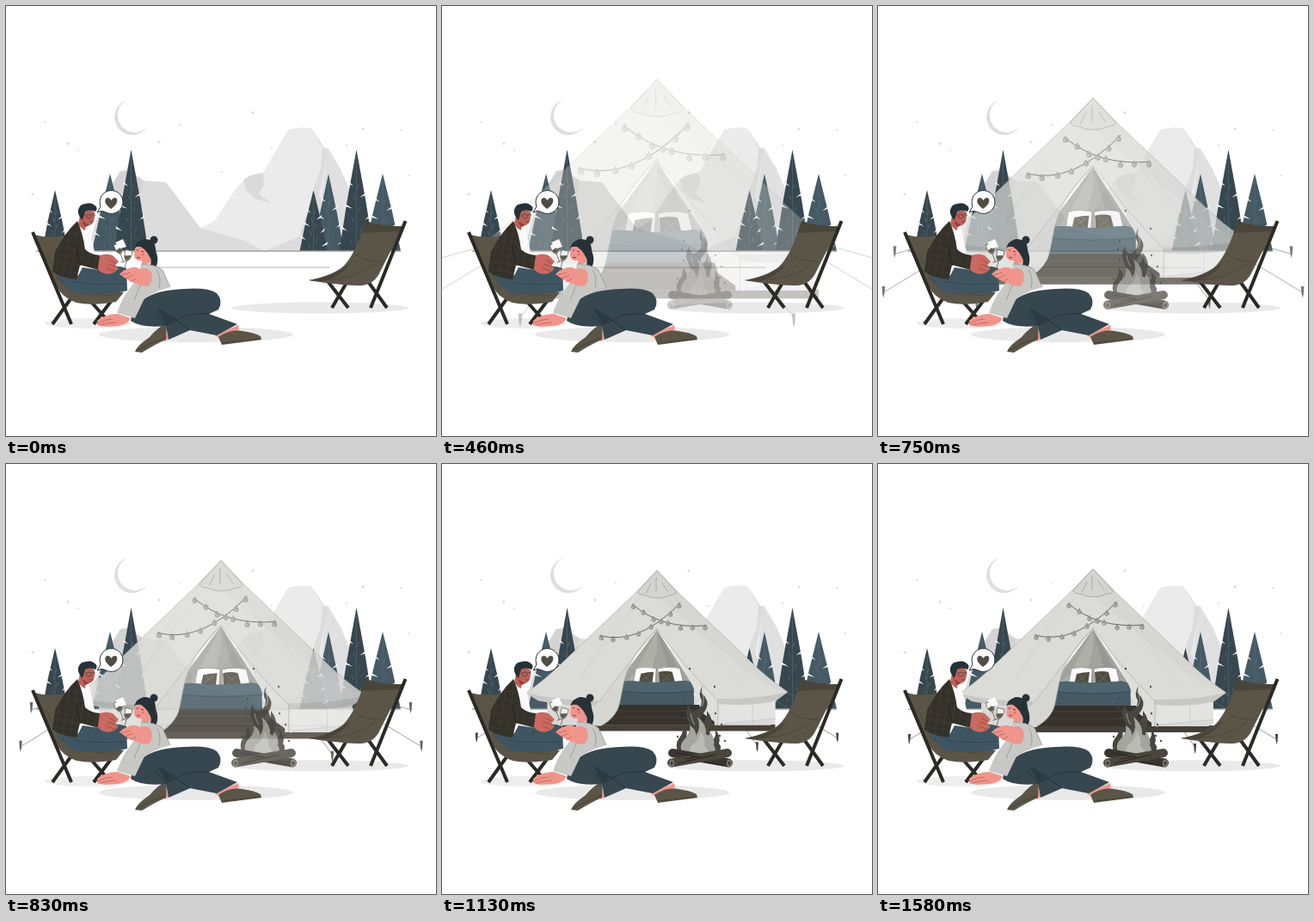
These frames come from a looping animation (500x500 px, 1620 ms). An HTML page with a canvas:

```html
<!DOCTYPE html>
<html lang="en">
<head>
<meta charset="utf-8">
<title>Evening at the camp</title>
<style>
html, body { margin: 0; width: 100%; height: 100%; overflow: hidden; background: #fff; }
canvas { display: block; width: 500px; height: 500px; }
</style>
</head>
<body>
<canvas id="stage"></canvas>
<script>
const LOOP = 1620, STEPS = 39, SIZE = 500;
const ratio = window.devicePixelRatio || 1;
const INK = '#263238', SLATE = '#37474f', BLUE = '#455a64', CANVAS = '#5b5548', FRAME = '#2b2a25';

const stage = document.getElementById('stage');
const layer = document.createElement('canvas');
for (const c of [stage, layer]) c.width = c.height = SIZE * ratio;
const main = stage.getContext('2d'), side = layer.getContext('2d');
let g = main;

function fill(color, d) {
  g.fillStyle = color;
  g.fill(new Path2D(d));
}
function line(color, width, d) {
  g.strokeStyle = color;
  g.lineWidth = width;
  g.stroke(new Path2D(d));
}
function oval(color, x, y, rx, ry = rx) {
  g.fillStyle = color;
  g.beginPath();
  g.ellipse(x, y, rx, ry, 0, 0, 7);
  g.fill();
}
function clear(ctx) {
  ctx.setTransform(1, 0, 0, 1, 0, 0);
  ctx.clearRect(0, 0, layer.width, layer.height);
  ctx.setTransform(ratio, 0, 0, ratio, 0, 0);
}

function tree(x, top, half, color, base = 285) {
  const h = base - top, bulge = half / 2 + 1.5, mid = top + h / 2;
  fill(color, `M${x} ${top}Q${x + bulge} ${mid} ${x + half} ${base}H${x - half}Q${x - bulge} ${mid} ${x} ${top}Z`);
  line('#60737c', 0.5, `M${x} ${top + 8}V${base}`);
  for (let i = 0; i < 6; i++) {
    const k = 0.34 + i * 0.11, y = top + h * k, dir = i % 2 ? 1 : -1;
    const edge = x + dir * (half * k + 1), len = half * (0.22 + 0.08 * (i % 3));
    fill('#f2f4f4', `M${edge + dir} ${y - 3}L${edge - dir * len} ${y + 2.5}L${edge + dir} ${y}Z`);
    line('#71828a', 0.5, `M${x - dir * half * k * 0.4} ${y}l${dir * 2} 5`);
  }
}

function background() {
  fill('#dedede', 'M141 109A21 21 0 1 0 165 140A20 20 0 1 1 141 109Z');
  const stars = [[45, 135], [72, 160], [84, 168], [31, 219], [178, 158], [202, 138], [251, 193],
    [287, 124], [309, 165], [396, 162], [415, 143], [459, 144], [469, 197]];
  stars.forEach(([x, y], i) => oval('#dadada', x, y, i % 3 === 1 || i === 3 ? 1.5 : 1));

  fill('#ebebeb', 'M215 264L243 249L262 220L272 207L283 197L299 194L318 161L328 144Q340 140 355 142L370 165L375 165L388 188L402 219L425 285H210Z');
  fill('#dadada', 'M276 202Q285 195 299 194L300 208L294 218L309 230L290 224L279 214Z');
  fill('#dcdcdc', 'M355 142L368 165L366 190L358 211L357 228L347 248L341 268L301 285H390L374 240L364 220L369 195L375 166L370 165Z');
  fill('#e0e0e0', 'M374 166L388 188L402 219L425 285H360L368 215Z');
  fill('#dcdcdc', 'M95 285L112 224L133 192L142 191L160 203L186 205L226 258L275 272L301 285Z');
  fill('#d3d3d3', 'M133 192L142 191L160 203L155 230L165 285H100L115 225Z');

  tree(57, 214, 15, SLATE);
  tree(121, 195, 21, BLUE);
  tree(145.5, 167, 20, SLATE);
  tree(375, 195, 18, BLUE);
  tree(357.5, 214, 16, SLATE);
  tree(438, 195, 21, BLUE);
  tree(407.5, 167, 20, SLATE);
  line('#a0a3a3', 1.3, 'M35 285H459');
  line('#b5b5b5', 1.2, 'M160 304H376');

  oval('#e9e9e9', 365, 351, 103, 6.5);
  oval('#ededed', 95, 369, 50, 6);
  oval('#e9e9e9', 221, 382, 113, 9);
}

function bulbs(points) {
  for (const [x, y] of points) {
    line('#555', 0.8, `M${x} ${y - 4}v3`);
    oval('#989894', x, y, 2.8);
    oval('#b2b2ad', x - 0.7, y + 0.5, 1.3);
  }
}

function ropes(direction) {
  g.save();
  g.translate(250, 0);
  g.scale(direction, 1);
  line('#6b6b68', 0.7, 'M145 265L202 281M142 277L213 320M86 284L118 328');
  for (const [x, y] of [[202, 273], [213.5, 314], [118.5, 325]])
    fill('#454540', `M${x - 1.6} ${y}h3.2l-.5 8l-.9 4l-1 -4Z`);
  g.restore();
}

function tent() {
  ropes(1);
  ropes(-1);
  fill('#454037', 'M138 304H390V312H138Z');
  fill('#d9d9d7', 'M120 271H390V302L384 305H120Z');
  fill('#e3e3e1', 'M322 275H390V297L322 303Z');
  line('#c4c4c1', 0.7, 'M363 279V304M322 304L390 297');

  // interior and bed
  fill('#a3a39e', 'M250 192L294 260V305H198L207 250Z');
  fill('#afafaa', 'M250 193L224 243L213 255H240L250 215Z');
  fill('#989893', 'M250 193L284 255H268Z');
  fill('#fafafa', 'M222 254L225 238Q236 235 249 238L248 255ZM252 255L251 238Q266 235 277 238L281 254Z');
  line('#777', 0.5, 'M222 254L225 238Q236 235 249 238L248 255M252 255L251 238Q266 235 277 238L281 254');
  fill('#514d42', 'M228 257L231 244Q239 242 246 242L244 258ZM253 258L252 242Q261 240 268 242L272 257Z');
  line('#8a8578', 0.5, 'M231 254L242 245M234 245L243 255M256 254L266 245M256 244L268 255');
  fill(BLUE, 'M206 255Q212 252 223 253Q248 256 276 253Q288 251 293 257L294 283H204Z');
  fill('#4e6570', 'M206 255Q212 252 223 253Q248 256 276 253Q288 251 293 257L294 264Q250 268 205 264Z');
  line('#30434d', 0.6, 'M205 265Q250 269 294 265');
  fill('#37322b', 'M190 281H318V305H180Z');
  line('#4d473d', 0.7, 'M192 288H310M188 296H315');

  // curtains and roof
  fill('#d6d6d3', 'M250 190Q219 220 211 253L206 278Q203 295 184 306H166L178 270Z');
  fill('#dededb', 'M250 190Q277 225 293 260L303 290L325 306V270Z');
  fill('#dbdbd8', 'M250 122L274 147L360 229Q381 250 405 266Q365 280 322 279Q280 233 250 191Q218 229 180 280Q138 279 95 267Q119 250 140 229L226 147Z');
  fill('#c7c7c4', 'M405 266Q365 275 321 274L323 280Q365 283 391 276ZM95 267Q138 277 181 276L178 282Q138 282 109 276Z');
  fill('#d6d6d3', 'M250 154L274 147L360 229Q381 250 405 266Q380 260 350 236Z');
  line('#a3a39f', 0.6, 'M250 122L226 147L140 229Q119 250 95 267M250 122L274 147L360 229Q381 250 405 266M250 191Q218 229 181 278M250 191Q280 233 322 276M250 191Q219 220 211 253L206 278Q203 295 184 305M322 276V305');
  line('#cbcbc7', 0.6, 'M230 154L170 235M271 154L330 235M202 180L160 250M300 183L350 258M197 262Q194 285 184 300');
  fill('#d4d4d1', 'M250 122L227 147Q228 151 235 151Q250 158 266 151Q273 151 273 147Z');
  line('#999994', 0.7, 'M250 122L227 147Q228 151 235 151Q250 158 266 151Q273 151 273 147ZM249 130V147M243 137L237 149M256 136L263 147');

  line('#4a4a4a', 0.8, 'M182 199Q229 211 278 160M221 162Q256 192 309 187');
  bulbs([[184, 202], [198, 204], [214, 201.5], [228, 197.5], [243, 189], [266, 174], [276, 164],
    [222, 165], [234, 172], [246, 180], [255, 183], [263, 185], [278, 190.5], [292, 190], [307, 190]]);
}

function fire() {
  fill('#47463f', 'M276 338Q269 326 277 317Q282 310 279 304Q287 310 284 318Q291 309 287 300Q281 291 287 279Q287 286 293 288Q302 285 302 275Q297 267 303 258Q300 266 306 271Q312 280 304 290Q299 294 302 300Q309 298 308 287Q317 297 312 309Q310 318 315 321Q320 315 317 308Q325 316 322 325Q327 330 320 338Z');
  fill('#a5a5a0', 'M281 338Q274 328 282 320Q290 313 288 304Q296 309 295 316Q302 307 297 294Q308 303 307 314Q311 318 312 311Q318 321 316 327Q320 333 315 338Z');
  fill('#bbbbb6', 'M290 338Q285 330 294 324Q300 317 301 310Q307 321 305 328Q311 332 308 338Z');
  line('#c5c5c0', 0.7, 'M301 264Q307 273 302 282M289 290Q291 300 294 303');
  for (const [x, y] of [[288, 238], [317, 259], [281, 273], [279, 283], [318, 290], [325, 303], [274, 317], [323, 316], [329, 322], [281, 296]])
    oval('#494842', x, y, 1.1, 1.3);
  g.lineCap = 'round';
  line('#393630', 10, 'M268 336L333 347.5');
  line('#4a463e', 10, 'M332 336L267 347.5');
  line('#25231f', 1, 'M273 336L300 341M275 348L317 338M305 346L327 350M283 343L299 340');
  g.lineCap = 'butt';
  for (const x of [267, 334]) {
    oval('#787268', x, 348, 3.2, 4.5);
    oval('#393630', x, 348, 1.4, 2);
  }
}

function chairs() {
  line(FRAME, 4, 'M374 320L398 351M397 320L379 351M420 319L443 351');
  fill(CANVAS, 'M418 250Q438 257 462 256L435 309Q429 323 414 325Q390 325 352 319Q381 313 393 302Q407 287 418 250Z');
  fill('#4a453a', 'M418 250Q438 257 462 256L459 262Q436 263 413 264ZM352 319Q383 314 401 298Q391 315 368 320Z');
  line('#454036', 0.7, 'M366 319Q407 318 430 300M406 289Q418 298 438 297');
  line(FRAME, 4, 'M464.5 250L424 351');

  line(FRAME, 4, 'M77 338L54 370M123 342L102 370M99 344L122 370');
  fill(CANVAS, 'M33 266Q52 271 73 266L75 306Q99 329 137 333L128 344Q100 349 82 345Q65 339 59 326Z');
  line('#454036', 0.7, 'M48 288L61 317Q76 335 126 337');
  line(FRAME, 4, 'M31 263L76 370');
}

function man() {
  const skin = '#bd6157', crease = '#8d3f3c';
  fill('#fafafa', 'M84 253L95 250L103 286L92 290L80 277Z');
  fill(skin, 'M87 240L99 237L103 240L103 246Q102 254 97 255L93 254L92 261Q86 258 84 253Z');
  fill(crease, 'M88 250L97 255L92 257Z');
  fill(INK, 'M84 241Q83 231 92 230Q99 228 102 231Q108 234 104 239Q98 236 92 239L89 249Q86 247 84 241Z');
  line(INK, 0.6, 'M93 243Q96 241 99 243Q100 247 96 247Q93 247 93 243M100 243Q103 241 104 244M97 251L101 251');

  fill('#3f5562', 'M58 309L82 317L89 304L109 307Q127 299 140 305L141 331Q118 337 81 334Q66 327 58 309Z');
  line('#2d414c', 0.7, 'M77 321Q105 325 139 323M110 307L104 315');
  const jacket = 'M83 250Q68 264 57 286L54 309Q67 317 82 318L86 301L108 307L110 290Q98 289 92 283Q89 263 83 250Z';
  fill('#34312a', jacket);
  g.save();
  g.clip(new Path2D(jacket));
  for (let i = 0; i < 8; i++)
    line('#454136', 0.6, `M50 ${260 + i * 9}L112 ${270 + i * 9}M${58 + i * 9} 250L${47 + i * 9} 320`);
  g.restore();
  line('#211f1b', 0.8, 'M81 279L84 291L87 302');
  fill('#c9695f', 'M109 290Q117 287 124 290L131 297L127 302L131 305Q124 314 114 311Q106 308 107 304Z');
  line(crease, 0.7, 'M120 295L127 299M118 300L128 303M117 305L126 308');
}

function glass(x, y, angle) {
  g.save();
  g.translate(x, y);
  g.rotate(angle);
  fill('#f4f4f0', 'M-4 -9H4Q5 1 0 4Q-5 1 -4 -9Z');
  fill('#615d4d', 'M-3.5 -2L3.5 -4Q4 1 0 3Q-4 1 -3.5 -2Z');
  line('#55554e', 0.7, 'M-4 -9H4Q5 1 0 4Q-5 1 -4 -9ZM0 4V13M-3 13H3');
  g.restore();
}

function woman() {
  const skin = '#f0958b', crease = '#b55b54';
  oval(INK, 172, 272, 4.5);
  fill(skin, 'M150 282Q152 276 160 276L169 283L168 299L158 301L158 296Q149 297 149 289Z');
  fill(INK, 'M149 281Q152 273 160 271Q168 270 173 277Q174 285 176 291Q177 299 174 304Q169 304 168 301Q170 295 166 290Q164 285 157 280Q153 279 149 281Z');
  line(INK, 0.8, 'M152 284l2 0M157 285l3 1M152 292Q154 294 156 292');
  oval('#e0776e', 159, 289, 1.6);

  fill(skin, 'M182 370L190 387L184 390ZM243 383L270 371L271 376L249 387Z');
  fill(CANVAS, 'M187 369L186 388Q174 393 158 403L150 402Q152 395 167 385Q177 373 187 369ZM247 385Q261 375 275 378Q290 380 296 384L297 388L251 394Z');
  line('#3d392f', 0.7, 'M151 401Q170 391 186 385M251 392L296 387');
  fill(SLATE, 'M145 366Q147 351 160 341Q175 330 207 329Q235 327 245 334Q253 343 247 353L236 358L269 370L245 383L214 377L189 388L186 372Q158 375 145 366Z');
  line('#24333a', 1, 'M178 352Q190 360 213 376M187 371L209 360Q225 357 236 358M173 357L186 371');
  fill('#2c3b43', 'M176 352L197 363L187 372Z');

  fill('#c8c8c5', 'M157 300Q174 300 182 307L191 327Q175 331 161 340L150 363L129 357Q135 339 145 327Q154 316 157 300Z');
  line('#8c8c88', 0.7, 'M175 307Q181 315 178 328M157 323L149 342M157 300Q173 300 182 307L191 327');
  fill(skin, 'M106 366Q115 358 130 358L145 363Q141 371 130 372Q113 374 106 371Z');
  line(crease, 0.7, 'M106 369Q116 364 124 364M109 371Q121 368 128 368');
  glass(132, 285, -0.35);
  glass(141, 293, 0.25);
  fill('#fafafa', 'M127 275L136 271L140 280L133 282Z');
  fill(skin, 'M132 312Q136 307 143 305Q150 302 156 306Q165 303 169 310Q172 320 165 326Q149 325 132 312Z');
  line(crease, 0.7, 'M134 313L145 310M138 317L148 313M144 321L151 317');
}

function bubble() {
  const d = 'M106 240L110 233A13.46 13.46 0 1 1 115.5 239.5Q110 237 106 240Z';
  fill('#fff', d);
  line(INK, 1, d);
  fill('#514d42', 'M122 236Q113 229 116 224Q120 221 122.5 226Q125 221 129 224Q131 230 122 236Z');
}

// Eased progress for cubic-bezier(.36, -.01, .5, 1.38)
function ease(x) {
  const curve = (u, a, b) => 3 * (1 - u) ** 2 * u * a + 3 * (1 - u) * u * u * b + u ** 3;
  let low = 0, high = 1;
  for (let i = 0; i < 24; i++) {
    const mid = (low + high) / 2;
    if (curve(mid, 0.36, 0.5) < x) low = mid; else high = mid;
  }
  return curve(low, -0.01, 1.38);
}

function blend(paint, alpha, zoom = 1) {
  if (alpha <= 0) return;
  g = side;
  clear(g);
  g.translate(250, 229.5);
  g.scale(zoom, zoom);
  g.translate(-250, -229.5);
  paint();
  g = main;
  g.globalAlpha = alpha;
  g.drawImage(layer, 0, 0, SIZE, SIZE);
  g.globalAlpha = 1;
}

function draw(step) {
  clear(main);
  g = main;
  const p = ease(Math.min(1, step / 37));
  const alpha = Math.max(0, Math.min(1, p));
  background();
  blend(tent, alpha, 1.5 - 0.5 * p);
  blend(fire, alpha);
  chairs();
  man();
  woman();
  bubble();
}

let shown = -1;
function tick() {
  const time = performance.now() % LOOP;
  const step = Math.floor((time + 3) * STEPS / LOOP) % STEPS;
  if (step !== shown) draw(shown = step);
  requestAnimationFrame(tick);
}
tick();
</script>
</body>
</html>
```
